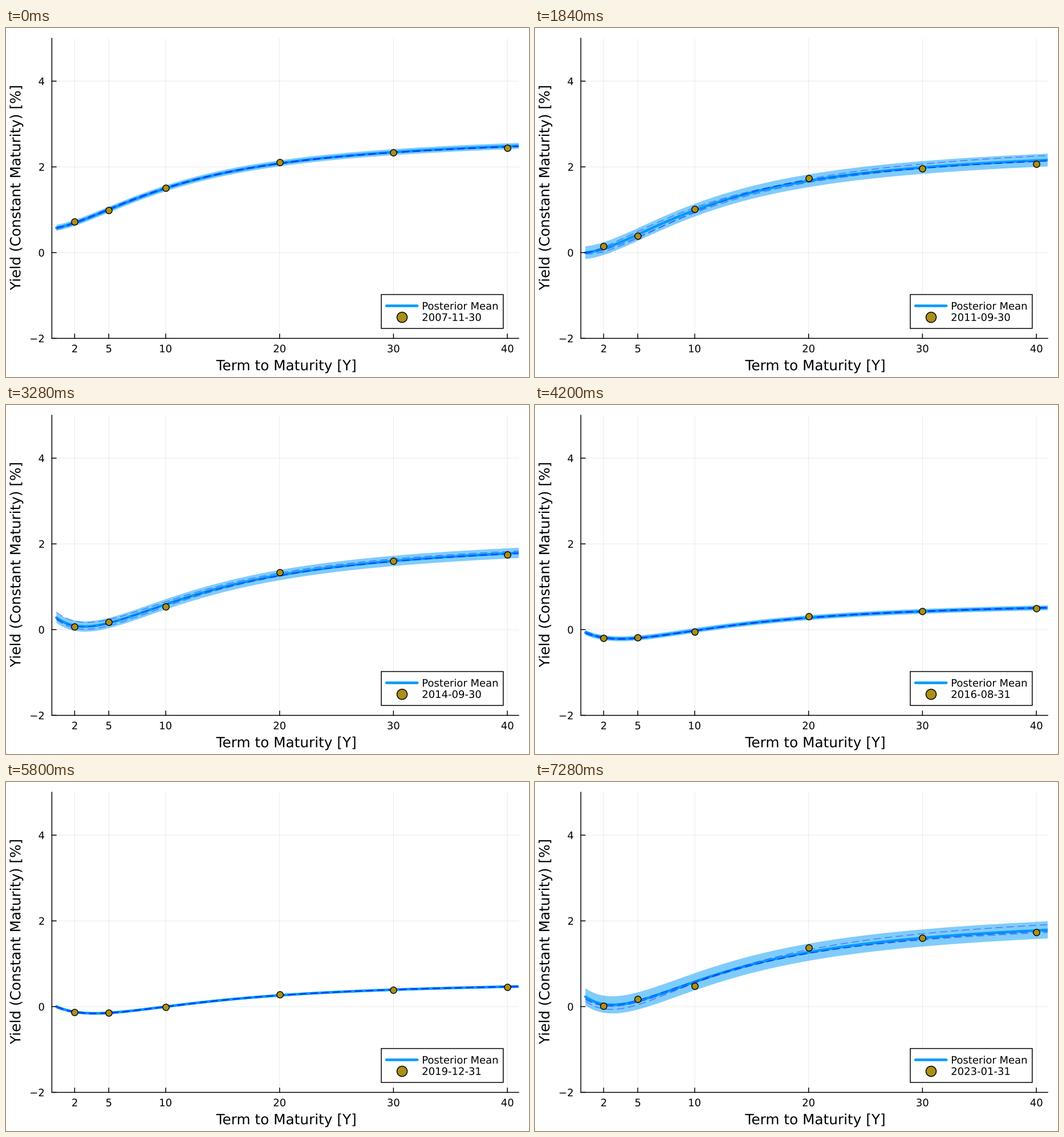
A matplotlib script for the animation above (7320 ms loop, 917 by 611 pixels).

```python
import numpy as np
import matplotlib.pyplot as plt
from matplotlib.animation import FuncAnimation
from matplotlib.patches import PathPatch, Polygon, Rectangle
from matplotlib.textpath import TextPath
from matplotlib.transforms import Affine2D

W, H, DPI = 917, 611, 64
MONTHS = 183
PT = 72 / DPI  # points per pixel
BLUE, GOLD = "#009AFA", "#AC8E18"
DECAY = 3.7  # years

plt.rcParams.update({"font.family": "DejaVu Sans",
                     "lines.scale_dashes": False})

TERMS = np.array([2, 5, 10, 20, 30, 40])
months = np.arange(MONTHS)
tau = np.linspace(.4, 41, 240)

# Turning points of the curve at its short end, at 10Y and at its long end
TURNS = [0, 7, 13, 19, 29, 34, 46, 62, 82, 97, 105, 131, 141, 145, 171, 182]
SHORT = [.58, .60, .10, -.05, -.12, -.10, 0, .15,
         .28, .12, -.07, .02, -.17, 0, .15, .23]
MID = [1.50, 1.62, 1.18, 1.37, 1.28, .94, .99, .75,
       .59, .30, -.02, .14, -.27, 0, .23, .58]
LONG = [2.49, 2.58, 1.96, 2.33, 2.42, 1.96, 2.16, 2.15,
        1.79, 1.46, .51, 1.08, .22, .47, 1.02, 1.79]
nodes = np.column_stack([np.interp(months, TURNS, v)
                         for v in (SHORT, MID, LONG)])

# Half width of the uncertainty band
band = np.interp(months, [0, 19, 82, 105, 145, 182],
                 [.07, .17, .12, .058, .03, .20])


def loadings(t):
    """Level, slope and hump of a Nelson-Siegel curve."""
    x = np.asarray(t, float) / DECAY
    g = (1 - np.exp(-x)) / x
    return np.column_stack([np.ones_like(x), g, g - np.exp(-x)])


# Maps the three node values to the curve at any term
solve = np.linalg.inv(loadings([.4, 10, 41]))
TO_CURVE = loadings(tau) @ solve
TO_TERMS = loadings(TERMS) @ solve

# Market misfit in band widths, drifting from an early to a late pattern
late = np.clip((months - 46) / 36, 0, 1)[:, None]
misfit = ((1 - late) * [.35, -.2, .15, .4, -.15, -.5]
          + late * [-.2, .2, -.45, .52, 0, -.22])
quotes = nodes @ TO_TERMS.T + band[:, None] * misfit

rng = np.random.default_rng(7)
draws = rng.normal(size=(MONTHS, 3, 3)) * [.6, .25, .28] * band[:, None, None]

fig = plt.figure(figsize=(W / DPI, H / DPI), dpi=DPI, facecolor="white")

# Plot area
L, R, T, B = 80.4, 899, 18, 543.4
ax = fig.add_axes([L / W, 1 - B / H, (R - L) / W, (B - T) / H])
ax.set(xlim=(0, 41), ylim=(-2, 5))
ax.axis("off")

# Pixel layer for frame, labels and legend
px = fig.add_axes([0, 0, 1, 1])
px.set(xlim=(0, W), ylim=(H, 0))
px.axis("off")


def stroke(xs, ys, width=1.5, color="black", **kw):
    px.plot(xs, ys, color=color, lw=width * PT, snap=False, **kw)


def label(x, y, s, size=18, align=0, turn=0):
    """Text outline on a baseline; align runs from 0 (left) to 1 (right)."""
    path = TextPath((0, 0), s, size=size)
    box = path.get_extents()
    place = (Affine2D().translate(-align * (box.x0 + box.x1), 0)
             .rotate_deg(turn).scale(1, -1).translate(x, y))
    patch = PathPatch(path, fc="black", lw=0, zorder=5,
                      transform=place + px.transData)
    px.add_artist(patch)
    return patch


def dot(axes, x, y, size, edge):
    return axes.plot(x, y, "o", ms=size * PT, mfc=GOLD, mec="black",
                     mew=edge * PT, zorder=4, snap=False)[0]


grid = dict(color="black", alpha=.1, lw=.8 * PT, zorder=0, snap=False)
for t in TERMS:
    x = L + t * (R - L) / 41
    ax.axvline(t, **grid)
    stroke([x, x], [B, B - 7.5])
    label(x, 567.7, str(t), align=.5)
for v in (-2, 0, 2, 4):
    y = B - (v + 2) * (B - T) / 7
    if v > -2:
        ax.axhline(v, **grid)
    stroke([L, L + 7.5], [y, y])
    label(67.9, y + 6.8, str(v).replace("-", "\u2212"), align=1)
stroke([L, L, R], [T, B, B])
label(490.5, 599.2, "Term to Maturity [Y]", 24.75, .5)
label(25.2, 280.4, "Yield (Constant Maturity) [%]", 24.75, .5, 90)

px.add_patch(Rectangle((658, 466.6), 213.8, 59.4, fc="white", ec="black",
                       lw=1.5 * PT, zorder=1, snap=False))
stroke([667, 721.2], [486.4, 486.4], 4.6, BLUE, solid_capstyle="round")
dot(px, 694.3, 506.2, 18, 1.5)
label(729.2, 493, "Posterior Mean")
date = label(729.2, 512.8, "2007-11-30")

ribbon = Polygon(np.zeros((2, 2)), closed=True, fc=BLUE, alpha=.5, lw=0,
                 zorder=1)
ax.add_patch(ribbon)
mean_line, = ax.plot([], [], color=BLUE, lw=4.6 * PT, zorder=2,
                     solid_capstyle="round")
samples = [ax.plot([], [], color="blue", alpha=.4, lw=1.5 * PT, zorder=3,
                   dashes=(13 * PT, 6.5 * PT), dash_capstyle="butt")[0]
           for _ in range(3)]
market = dot(ax, [], [], 11.3, 1.4)


def update(m):
    y = TO_CURVE @ nodes[m]
    ribbon.set_xy(np.column_stack([np.r_[tau, tau[::-1]],
                                   np.r_[y + band[m], (y - band[m])[::-1]]]))
    mean_line.set_data(tau, y)
    for line, offset in zip(samples, draws[m]):
        line.set_data(tau, TO_CURVE @ (nodes[m] + offset))
    market.set_data(TERMS, quotes[m])
    next_month = np.datetime64("2007-11") + int(m) + 1
    month_end = next_month.astype("datetime64[D]") - 1
    date.set_path(TextPath((0, 0), str(month_end), size=18))
    return [ribbon, mean_line, *samples, market, date]


anim = FuncAnimation(fig, update, frames=MONTHS, interval=40, repeat=True,
                     repeat_delay=0, blit=False)
plt.show()
```
